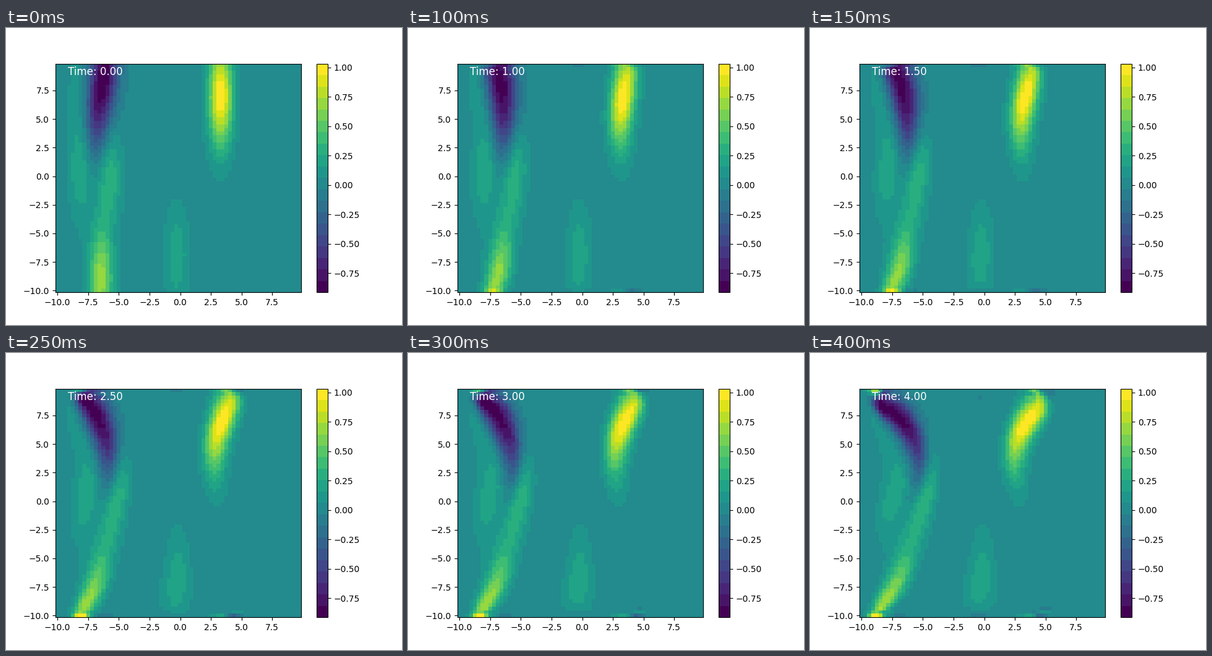
Recreate the animation shown at these times as a matplotlib script. Size 640x480 px, loop 0.45 s.

```python
import numpy as np
import matplotlib.pyplot as plt
from matplotlib.animation import FuncAnimation

N, SIZE = 64, 20.0
STEP = SIZE / N
FRAMES, FRAME_DT, SUBSTEPS = 9, 0.5, 20
VMIN, VMAX, LEVELS = -0.9137, 1.0323, 20
WIDTH, HEIGHT = 0.7, 3.1

axis = -SIZE / 2 + STEP * np.arange(N)
X, Y = np.meshgrid(axis, axis)

k = 2 * np.pi * np.fft.fftfreq(N, STEP)
KX, KY = np.meshgrid(k, k)
K2 = KX**2 + KY**2
K2[0, 0] = 1.0


def vortex(amp, cx, cy):
    return amp * np.exp(-((X - cx) / WIDTH) ** 2 / 2
                        - ((Y - cy) / HEIGHT) ** 2 / 2)


def start():
    right = vortex(1.05, 3.3, 7)
    low = vortex(0.23, -0.3, -7)
    corner = vortex(0.7, -6.45, -9)
    pair = vortex(0.36, -5.8, 0.2) + vortex(0.25, -8.1, 0.6)
    haze = vortex(0.11, -8.25, 7.5)
    dark = vortex(-0.66, -6.8, 5.8) + vortex(-0.72, -5.95, 10)
    return right + low + corner + pair + haze + dark


def slope(f, ax):
    return (np.roll(f, -1, ax) - np.roll(f, 1, ax)) / (2 * STEP)


def rate(w):
    """Advection of vorticity by its own stream function."""
    hat = -np.fft.fft2(w) / K2
    hat[0, 0] = 0
    psi = np.fft.ifft2(hat).real
    u, v = slope(psi, 0), -slope(psi, 1)
    return -u * slope(w, 1) - v * slope(w, 0)


def advance(w, dt):
    a = rate(w)
    b = rate(w + dt / 2 * a)
    c = rate(w + dt / 2 * b)
    d = rate(w + dt * c)
    return w + dt / 6 * (a + 2 * b + 2 * c + d)


def solve():
    w = start()
    fields = [w]
    for _ in range(FRAMES - 1):
        for _ in range(SUBSTEPS):
            w = advance(w, FRAME_DT / SUBSTEPS)
        fields.append(w)
    return fields


fields = solve()

fig, ax = plt.subplots(figsize=(6.4, 4.8), dpi=100)
mesh = ax.pcolormesh(X, Y, fields[0], cmap=plt.get_cmap("viridis", LEVELS),
                     vmin=VMIN, vmax=VMAX, shading="nearest")
fig.colorbar(mesh)
label = ax.text(0.05, 0.95, "", transform=ax.transAxes, color="white",
                fontsize=12)


def draw(i):
    mesh.set_array(fields[i])
    label.set_text(f"Time: {i * FRAME_DT:.2f}")
    return mesh, label


anim = FuncAnimation(fig, draw, frames=FRAMES, interval=50, repeat=True,
                     repeat_delay=0)
plt.show()
```
